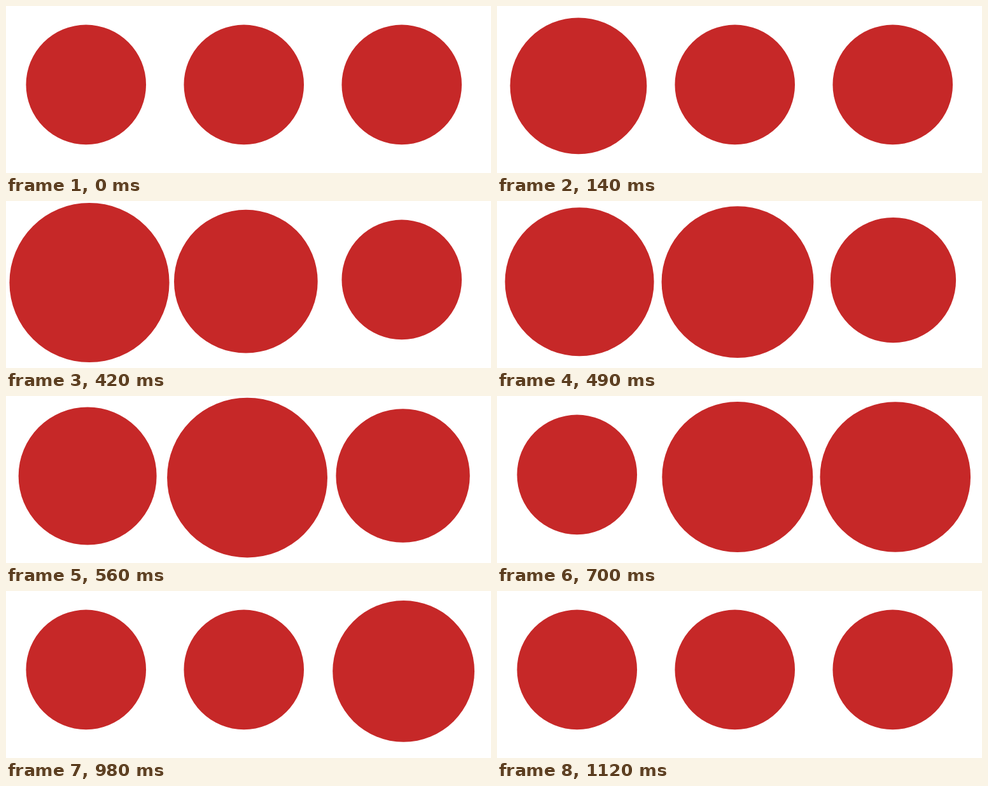
Recreate the animation shown at these times as an HTML page. Size 762 px wide and 263 px high, loop 1540 ms.

```html
<!DOCTYPE html>
<html lang="en">
<head>
<meta charset="utf-8">
<title>Pulsing dots</title>
<style>
  html, body { margin: 0; width: 100%; height: 100%; overflow: hidden; background: #fff; }
  svg { display: block; fill: #c62828; }
</style>
</head>
<body>
<svg width="762" height="263" viewBox="0 0 762 263"><circle/><circle/><circle/></svg>
<script>
const STEP = 70, LOOP = 1540;
const RISE = 6.55, FALL = 8.55, SPAN = 9.66; // growth per step, steps per pulse
const DELAY = 3.17;
const dots = document.querySelectorAll('circle');

function draw() {
  const step = Math.floor(performance.now() % LOOP / STEP);
  dots.forEach((dot, i) => {
    const t = step - i * DELAY;
    const grow = Math.max(0, Math.min(RISE * t, FALL * (SPAN - t)));
    dot.setAttribute('cx', 125.75 + 248 * i + 0.168 * grow);
    dot.setAttribute('cy', 123.9 + 0.148 * grow);
    dot.setAttribute('r', 94.3 + grow);
  });
  requestAnimationFrame(draw);
}
draw();
</script>
</body>
</html>
```
